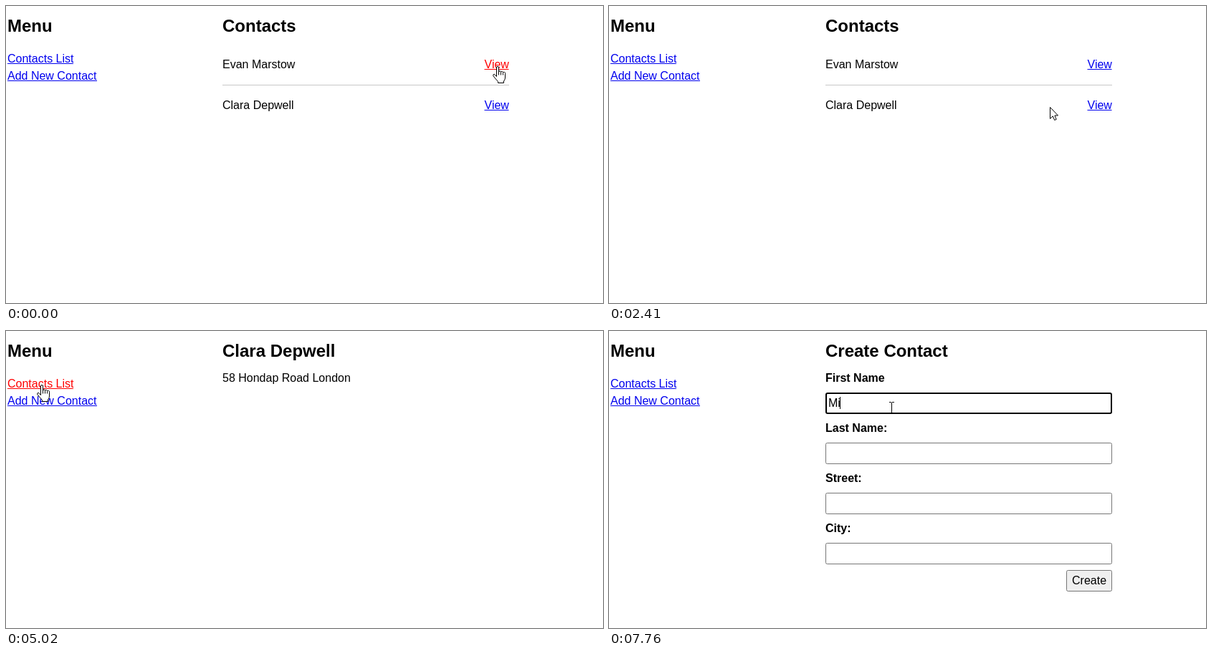
Write an HTML page with a canvas that moves like this. It is 833 px wide and 415 px high and loops after 8000 ms.

```html
<!DOCTYPE html>
<html lang="en">
<head>
<meta charset="utf-8">
<title>Contacts</title>
<style>
  html, body { margin: 0; width: 100%; height: 100%; overflow: hidden; background: #fff; }
  canvas { display: block; }
</style>
</head>
<body>
<canvas id="stage" width="833" height="415"></canvas>
<script>
const ctx = document.getElementById('stage').getContext('2d');
const LOOP = 8000;
const FACE = '"Liberation Sans", Arial, sans-serif';
const BLUE = '#0000ee', RED = '#ff0000', GREY = '#767676';
const LEFT = 302, RIGHT = 702;

const people = [
  { name: 'Evan Marstow', address: '47 Pelm Street London' },
  { name: 'Clara Depwell', address: '58 Hondap Road London' }
];

// Each track lists [start ms, value...]; a value holds until the next entry.
const pages = [
  [0, 'list'], [120, 'first'], [1910, 'list'], [3560, 'loading'],
  [3680, 'second'], [5140, 'list'], [6180, 'form']
];

const presses = [
  [0, 'view0'], [120, ''], [1780, 'contacts'], [1910, ''], [3440, 'view1'],
  [3560, ''], [5020, 'contacts'], [5140, ''], [6030, 'add'], [6180, '']
];

const moves = [
  [0, 'hand', 685, 84], [120, 'arrow', 685, 84],
  [1090, 'arrow', 72, 35], [1210, 'arrow', 16, 60], [1330, 'arrow', 42, 73], [1480, 'hand', 42, 73],
  [2170, 'arrow', 250, 70], [2290, 'arrow', 520, 120], [2410, 'arrow', 615, 141],
  [2560, 'arrow', 625, 150], [2680, 'arrow', 640, 157], [2800, 'arrow', 660, 155],
  [2920, 'hand', 680, 147], [3040, 'hand', 688, 143], [3560, 'arrow', 688, 143],
  [4210, 'arrow', 480, 110], [4330, 'arrow', 120, 79], [4450, 'arrow', 10, 84],
  [4600, 'hand', 24, 70], [4750, 'arrow', 36, 61], [4870, 'hand', 49, 75],
  [5640, 'hand', 56, 88], [5760, 'hand', 64, 101], [5910, 'hand', 67, 95],
  [6300, 'arrow', 150, 140], [6420, 'arrow', 320, 220], [6540, 'arrow', 410, 265],
  [6680, 'beam', 400, 130], [6810, 'beam', 394, 103], [6930, 'beam', 394, 107]
];

const FOCUS = 6810;
const typing = [[0, ''], [7640, 'M'], [7760, 'Mi']];
const caret = [[0, false], [FOCUS, true], [7210, false], [7640, true]];

const arrowPath = new Path2D('M.5 .5V16.5L4.3 12.9L6.7 18.5L9.2 17.4L6.9 12H11.5Z');
const handPath = new Path2D(
  'M5.5 14.5V2a1.5 1.5 0 0 1 3 0V8a1.5 1.3 0 0 1 3 .5a1.5 1.3 0 0 1 3 .8' +
  'a1.5 1.3 0 0 1 3 1V16Q17.5 19 15.5 21V23.5H7.5V21.5L3.5 17L.8 13.5' +
  'Q.3 11.3 2.5 11.3Z');
const knuckles = new Path2D('M8.5 8V12.5M11.5 8.5V12.5M14.5 9.5V12.5');

function at(track, t) {
  let found = track[0];
  for (const entry of track) if (entry[0] <= t) found = entry;
  return found.slice(1);
}

function text(str, x, y, { size = 16, bold = false, color = '#000' } = {}) {
  ctx.font = `${bold ? 'bold ' : ''}${size}px ${FACE}`;
  ctx.fillStyle = color;
  ctx.fillText(str, x, y);
  return ctx.measureText(str).width;
}

function title(str, x) {
  text(str, x, 36, { size: 24, bold: true });
}

function link(str, x, y, active) {
  const w = text(str, x, y, { color: active ? RED : BLUE });
  ctx.fillRect(x, y + 1, Math.round(w), 1);
}

function box(x, y, w, h, { line = 1, edge = GREY, fill = '#fff' } = {}) {
  ctx.beginPath();
  ctx.roundRect(x + line / 2, y + line / 2, w - line, h - line, 2);
  ctx.fillStyle = fill;
  ctx.fill();
  ctx.strokeStyle = edge;
  ctx.lineWidth = line;
  ctx.stroke();
}

function drawMenu(pressed) {
  title('Menu', 2);
  link('Contacts List', 2, 79, pressed === 'contacts');
  link('Add New Contact', 2, 103, pressed === 'add');
}

function drawList(pressed) {
  title('Contacts', LEFT);
  people.forEach((person, i) => {
    const y = 87 + i * 57;
    text(person.name, LEFT, y);
    link('View', 667.5, y, pressed === 'view' + i);
  });
  ctx.fillStyle = '#c8c8c8';
  ctx.fillRect(LEFT, 110, RIGHT - LEFT, 1);
}

function drawPerson({ name, address }) {
  title(name, LEFT);
  text(address, LEFT, 71);
}

function drawForm(t) {
  title('Create Contact', LEFT);
  ['First Name', 'Last Name:', 'Street:', 'City:'].forEach((label, i) => {
    const focused = i === 0 && t >= FOCUS;
    text(label, LEFT, 71 + i * 70, { bold: true });
    box(LEFT, 86 + i * 70, RIGHT - LEFT, 30, focused ? { line: 2, edge: '#000' } : {});
  });
  box(638, 334, 64, 30, { fill: '#efefef' });
  text('Create', 646, 354);

  const [typed] = at(typing, t);
  const w = text(typed, 306, 106);
  if (at(caret, t)[0]) ctx.fillRect(306 + Math.floor(w), typed ? 92 : 93, 1, 17);
}

function drawBeam() {
  ctx.fillStyle = '#000';
  ctx.fillRect(0, -7, 1, 15);
  for (const y of [-8, 8]) {
    ctx.fillRect(-3, y, 3, 1);
    ctx.fillRect(1, y, 3, 1);
  }
}

function drawCursor(kind, x, y) {
  ctx.save();
  ctx.translate(kind === 'hand' ? x - 6 : x, y);
  if (kind === 'beam') {
    drawBeam();
  } else {
    const path = kind === 'hand' ? handPath : arrowPath;
    ctx.fillStyle = '#fff';
    ctx.strokeStyle = '#000';
    ctx.lineWidth = 1;
    ctx.lineJoin = 'round';
    ctx.fill(path);
    ctx.stroke(path);
    if (kind === 'hand') ctx.stroke(knuckles);
  }
  ctx.restore();
}

function draw(t) {
  const [page] = at(pages, t);
  const [pressed] = at(presses, t);
  ctx.fillStyle = '#fff';
  ctx.fillRect(0, 0, 833, 415);
  drawMenu(pressed);
  if (page === 'list') drawList(pressed);
  else if (page === 'loading') text('Loading', LEFT, 27);
  else if (page === 'form') drawForm(t);
  else drawPerson(people[page === 'first' ? 0 : 1]);
  drawCursor(...at(moves, t));
}

const start = performance.now();
function tick() {
  draw((performance.now() - start) % LOOP);
  requestAnimationFrame(tick);
}
tick();
</script>
</body>
</html>
```
